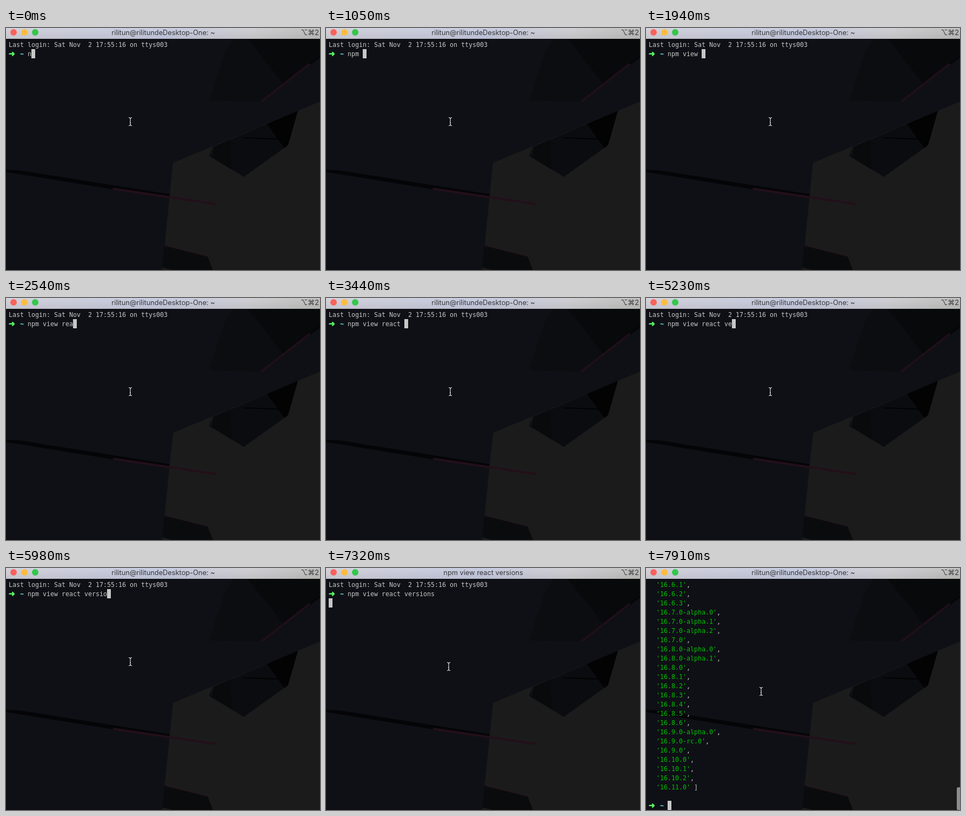
An HTML page that plays this animation: 581 px wide and 447 px high, repeating every 8000 ms.

```html
<!DOCTYPE html>
<html lang="en">
<head>
<meta charset="utf-8">
<title>Terminal session</title>
<style>
  html, body { margin: 0; width: 100%; height: 100%; overflow: hidden; background: #0f1016; }
  svg { display: block; width: 581px; height: 447px; }
  text { white-space: pre; }
  .mono { font: 11.63px "DejaVu Sans Mono", monospace; fill: #c7c7c7; }
  .bar { font: 12.8px Inter, sans-serif; fill: #37373b; }
  .arrow { font: 14px "DejaVu Sans", sans-serif; fill: #5ffa68; stroke: #5ffa68; stroke-width: .8; }
  .path { fill: #60fdff; font-weight: bold; }
  .string { fill: #00c200; }
</style>
</head>
<body>
<svg viewBox="0 0 581 447" xmlns="http://www.w3.org/2000/svg">
  <defs>
    <linearGradient id="barFill">
      <stop offset="0" stop-color="#d3d3dc"/>
      <stop offset=".5" stop-color="#c7cce1"/>
      <stop offset=".78" stop-color="#d0d0d4"/>
      <stop offset="1" stop-color="#c0c0be"/>
    </linearGradient>
    <linearGradient id="barShade" x2="0" y2="1">
      <stop offset="0" stop-opacity="0"/>
      <stop offset="1" stop-opacity=".07"/>
    </linearGradient>
  </defs>

  <!-- wallpaper -->
  <path d="M420 20L404 46 376 134 470 136 513 103 447 20Z" fill="#0c0d10"/>
  <path d="M447 20L513 103 581 52V20Z" fill="#08090b"/>
  <path d="M581 136L309 249 289 447H581Z" fill="#1b1b1b"/>
  <path d="M540 153L382 220 376 236 440 275 521 217Z" fill="#0b0c0f"/>
  <path d="M415 206L382 220 376 236 417 261Z" fill="#090a0c"/>
  <path d="M540 153L483 177 515 222 522 216Z" fill="#030304"/>
  <path d="M0 262L25 263 303 307V311L198 298 0 266Z" fill="#050507"/>
  <path d="M293 402L373 422 383 447H308L289 442Z" fill="#0a0b0d"/>
  <g fill="none">
    <path d="M383 220L379 236" stroke="#1b1b1b" stroke-width="1.5"/>
    <path d="M440 203L505 205" stroke="#020203" stroke-width="2"/>
    <path d="M562 67L581 53" stroke="#050507" stroke-width="3"/>
    <g stroke="#230f1a">
      <path d="M472 136L562 66" stroke-width="3"/>
      <path d="M198 297L388 325" stroke-width="4"/>
      <path d="M293 402L373 422"/>
    </g>
  </g>

  <!-- title bar -->
  <rect width="581" height="20" fill="url(#barFill)"/>
  <rect width="581" height="20" fill="url(#barShade)"/>
  <circle cx="14" cy="8" r="6" fill="#fc605b"/>
  <circle cx="34" cy="8" r="6" fill="#fdbc40"/>
  <circle cx="54" cy="8" r="6" fill="#34c84a"/>
  <text id="title" class="bar" x="291" y="13" text-anchor="middle"></text>
  <text class="bar" x="579" y="13" text-anchor="end">⌥⌘2</text>

  <rect id="cursor" width="7" height="17" fill="#c7c7c7"/>
  <g id="session" class="mono">
    <text x="5" y="35">Last login: Sat Nov  2 17:55:16 on ttys003</text>
    <text id="command" x="40" y="52"></text>
  </g>
  <g id="output" class="mono"></g>
  <g id="prompt" class="mono">
    <text class="arrow" x="5" y="52">➜</text>
    <text class="path" x="26" y="52">~</text>
  </g>
  <rect id="scrollbar" x="575" y="405" width="8" height="42" rx="3" fill="#8c8c8c"/>
  <path id="pointer" d="M-3 -7.5Q0 -7.5 0 -5Q0 -7.5 3 -7.5M0 -5V5M-3 7.5Q0 7.5 0 5Q0 7.5 3 7.5M-1 2H1"
        fill="none" stroke="#eee" stroke-width="1.1"/>
</svg>
<script>
const LOOP = 8000, BEAT = 149.25, LEAD = 4;
const CELL = 7, ROW = 17, LEFT = 5, TOP = 22;
const IDLE_TITLE = "rilitun@rilitundeDesktop-One: ~";

// One entry per beat: "." is a pause, "<" deletes a character.
const KEYS = [..."npm.... .view .reac...t .ve.<<...v.e.rs.", "io", "n", "s"];
const ENTER = 44, RUNNING = 47, DRAG = 48, PRINTED = 50, IDLE = 52, DRAG_END = 53;

const el = id => document.getElementById(id);
const show = (id, on) => el(id).setAttribute("visibility", on ? "visible" : "hidden");
const move = (id, x, y) => el(id).setAttribute("transform", `translate(${x} ${y})`);
const mix = (a, b, p) => a + (b - a) * p;

function press(line, key) {
  if (key === ".") return line;
  return key === "<" ? line.slice(0, -1) : line + key;
}
const typedBy = beat => KEYS.slice(0, beat + 1).reduce(press, "");

function series(minor, { alpha = 0, rc = 0, patches = 1 }) {
  const count = (n, prefix) => Array.from({ length: n }, (_, i) => `16.${minor}.${prefix}${i}`);
  return [...count(alpha, "0-alpha."), ...count(rc, "0-rc."), ...count(patches, "")];
}

const versions = [
  ...series(6, { patches: 4 }).slice(1),
  ...series(7, { alpha: 3 }),
  ...series(8, { alpha: 2, patches: 7 }),
  ...series(9, { alpha: 1, rc: 1 }),
  ...series(10, { patches: 3 }),
  ...series(11, {})
];

el("output").innerHTML = versions.map((version, i) => {
  const end = i < versions.length - 1 ? "," : " ]";
  return `<text x="${LEFT + 2 * CELL}" y="${TOP + 13 + i * ROW}"><tspan class="string">'${version}'</tspan>${end}</text>`;
}).join("");

function draw(t) {
  const beat = Math.floor((t + LEAD) / BEAT);
  const line = typedBy(beat), printed = beat >= PRINTED;
  const [column, row] = printed ? [5, versions.length + 1] : beat >= ENTER ? [0, 2] : [5 + line.length, 1];
  const drag = Math.min(1, Math.max(0, (beat - DRAG) / (DRAG_END - DRAG))) ** 1.1;

  el("title").textContent = beat >= RUNNING && beat < IDLE ? line : IDLE_TITLE;
  el("command").textContent = line;
  move("cursor", LEFT + column * CELL, TOP + row * ROW);
  move("prompt", 0, printed ? versions.length * ROW : 0);
  move("pointer", Math.round(mix(230, 213, drag)), Math.round(mix(173, 228, drag)));
  show("session", !printed);
  show("output", printed);
  show("scrollbar", printed);
}

const begin = performance.now();
function tick() {
  draw((performance.now() - begin) % LOOP);
  requestAnimationFrame(tick);
}
tick();
</script>
</body>
</html>
```
